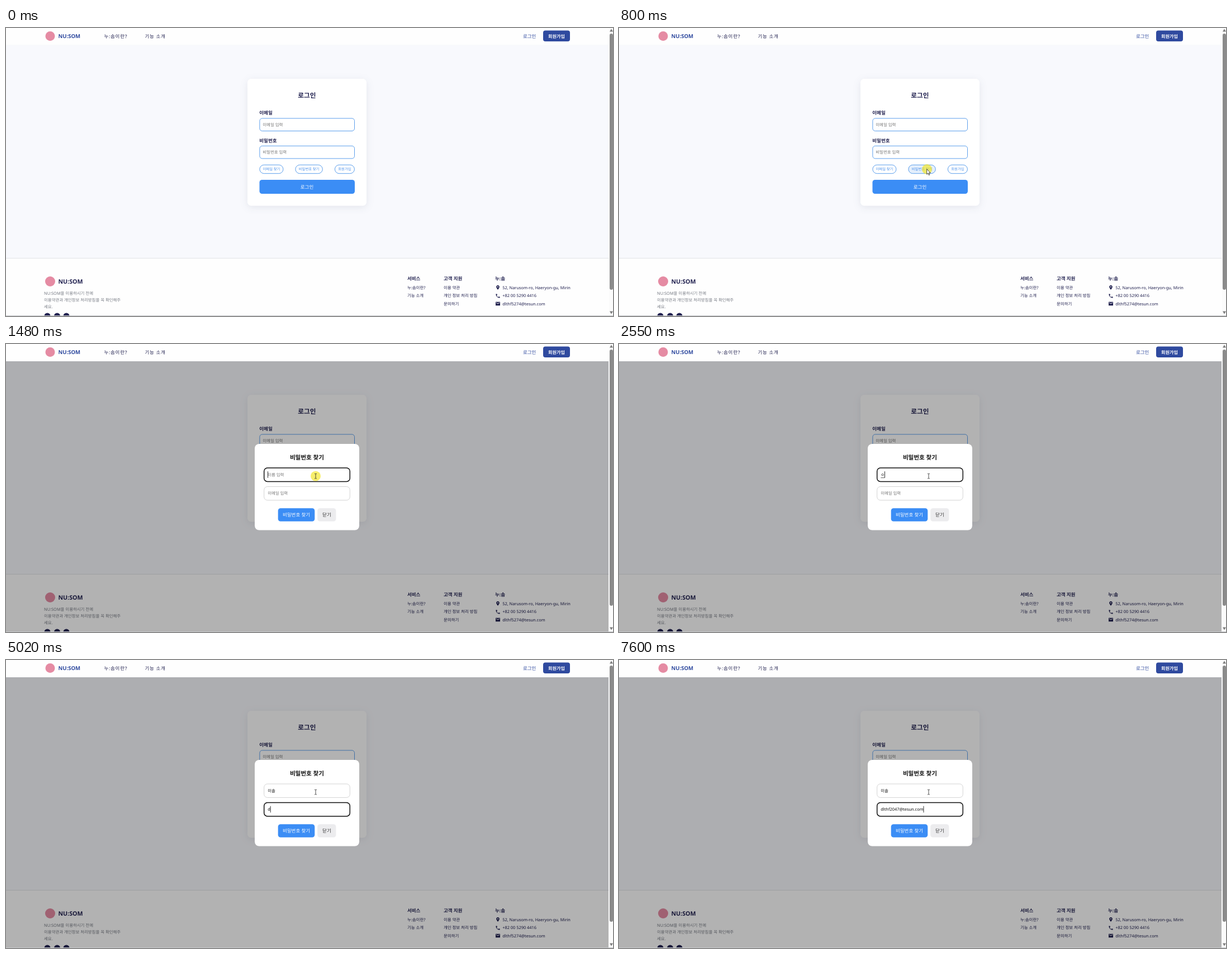
Animation, 1086 px wide and 516 px high, one loop 8000 ms. Source, as an HTML page:

```html
<!DOCTYPE html>
<html lang="ko">
<head>
<meta charset="utf-8">
<title>비밀번호 찾기</title>
<style>
  html, body { margin: 0; width: 100%; height: 100%; overflow: hidden; background: #f8f9fd; }
  svg { display: block; width: 1086px; height: 516px; }
  text {
    font-family: 'Noto Sans', 'Noto Sans CJK KR', 'Noto Sans CJK', sans-serif;
    text-rendering: geometricPrecision;
    white-space: pre;
  }
  .card { filter: drop-shadow(0 3px 7px rgba(30, 40, 80, .09)); }
</style>
</head>
<body>
<svg id="stage" viewBox="0 0 1086 516" xmlns="http://www.w3.org/2000/svg"></svg>
<script>
const LOOP = 8000, OPEN = 830, FOCUS = 1420, TAB = 3310;
const NAVY = '#20204f', INDIGO = '#2f4a9f', BLUE = '#3b8df5', PINK = '#e58ba3';
const S = 7.42, M = 8.48; // small and medium type

const text = (x, y, str, size, fill, weight = 400, extra = '') =>
  `<text x="${x}" y="${y}" font-size="${size}" fill="${fill}" font-weight="${weight}" ${extra}>${str}</text>`;
const mid = (x, y, str, size, fill, weight) => text(x, y, str, size, fill, weight, 'text-anchor="middle"');
const rect = (x, y, w, h, r, fill, extra = '') =>
  `<rect x="${x}" y="${y}" width="${w}" height="${h}" rx="${r}" fill="${fill}" ${extra}/>`;
const dot = (x, y, r, fill, extra = '') => `<circle cx="${x}" cy="${y}" r="${r}" fill="${fill}" ${extra}/>`;
const line = color => `stroke="${color}" stroke-width="1"`;
const icon = (cy, d) =>
  `<path transform="translate(875.2 ${cy - 4.8}) scale(.4)" fill="${NAVY}" fill-rule="evenodd" d="${d}"/>`;

function header() {
  return rect(0, 0, 1079, 31, 0, '#fefefe') + rect(0, 30.5, 1079, .5, 0, '#f1f2f6')
    + dot(79, 14.5, 8.5, PINK)
    + text(93.5, 18.2, 'NU:SOM', 9.54, INDIGO, 600)
    + text(175.5, 18, '누:솜이란?', M, NAVY, 500, 'letter-spacing=".75"')
    + text(248.5, 18, '기능 소개', M, NAVY, 500, 'letter-spacing=".75"')
    + text(925, 17.8, '로그인', M, INDIGO, 500)
    + rect(961, 4.5, 48, 19.5, 4, INDIGO)
    + mid(985, 17.7, '회원가입', 8.1, '#fff', 700);
}

function loginCard() {
  const field = (y, label, hint) =>
    text(453.3, y - 6.6, label, M, NAVY, 700)
    + rect(453.9, y, 169.6, 22.6, 4.5, '#fff', line('#5c9fec'))
    + text(459.3, y + 14, hint, S, '#757575');
  const pill = (x, w, label, id = '') =>
    rect(x, 245.3, w, 15.4, 7.7, '#fff', line('#5c9fec') + id)
    + mid(x + w / 2, 255.3, label, 6.36, '#4a90ea');
  return rect(432, 91, 213, 227.5, 6.5, '#fff', 'class="card"')
    + mid(538.3, 125.3, '로그인', 11.66, NAVY, 700)
    + field(161.9, '이메일', '이메일 입력')
    + field(211.3, '비밀번호', '비밀번호 입력')
    + pill(453.9, 42, '이메일 찾기')
    + pill(517.9, 48.4, '비밀번호 찾기', ' id="pill"')
    + pill(588.4, 35, '회원가입')
    + rect(453.5, 272, 170.5, 25, 4.5, BLUE)
    + mid(538.5, 287.6, '로그인', M, '#fff', 500);
}

function footer() {
  const column = (x, title, items, indent = 0) =>
    text(x, 451.6, title, M, NAVY, 700)
    + items.map((s, i) => text(x + indent, 467.7 + i * 14.5, s, S, NAVY)).join('');
  const notes = ['NU:SOM을 이용하시기 전에', '이용약관과 개인정보 처리방침을 꼭 확인해주', '세요.'];
  return rect(0, 412, 1079, 104, 0, '#fefefe') + rect(0, 412, 1079, 1, 0, '#e2e4e8')
    + dot(79, 454, 9, PINK)
    + text(93.5, 457.6, 'NU:SOM', 10.6, NAVY, 600)
    + notes.map((s, i) => text(68, 477.9 + i * 12, s, S, '#777b84')).join('')
    + [74, 91.5, 108].map(x => dot(x, 516, 5.5, NAVY)).join('')
    + column(718, '서비스', ['누:솜이란?', '기능 소개'])
    + column(783, '고객 지원', ['이용 약관', '개인 정보 처리 방침', '문의하기'])
    + column(875, '누:솜', ['52, Narusom-ro, Haeryon-gu, Mirin', '+82 00 5290 4416', 'dlthf5274@tesun.com'], 13.2)
    + icon(465, 'M12 2C8 2 5 5 5 9c0 5 7 13 7 13s7-8 7-13c0-4-3-7-7-7zm0 4.5a2.5 2.5 0 0 1 0 5a2.5 2.5 0 0 1 0-5z')
    + icon(480, 'M6.6 10.8c1.5 2.8 3.8 5.1 6.6 6.6l2.2-2.2c.3-.3.7-.4 1-.2 1.1.4 2.3.6 3.6.6.6 0 1 .4 1 1V20c0 .6-.4 1-1 1C10.600 21 3 13.400 3 4c0-.6.4-1 1-1h3.500c.6 0 1 .4 1 1 0 1.300.2 2.500.6 3.600.1.300 0 .700-.300 1z')
    + icon(494, 'M2 4h20v16H2zM20 8V6l-8 5-8-5v2l8 5z');
}

function modal() {
  const input = (id, y) => `<g id="${id}">`
    + rect(461.7, y, 153.6, 24.4, 6, '#fff')
    + text(468.2, y + 14.7, '', S, '#111')
    + rect(0, y + 17.4, 6.6, .7, 0, '#222', 'class="under"')
    + rect(0, y + 6.2, .8, 11.6, 0, '#000', 'class="caret"') + '</g>';
  return '<g id="modal">' + rect(0, 31, 1078, 484, 0, '#000', 'opacity=".3"')
    + rect(445, 179, 187, 154.5, 8, '#fff')
    + mid(538.5, 207, '비밀번호 찾기', 10.6, '#111', 700)
    + input('name', 222) + input('mail', 255.5)
    + rect(486.7, 294.3, 65.6, 23.4, 4.5, BLUE)
    + mid(519.5, 309, '비밀번호 찾기', M, '#fff', 500)
    + rect(557.2, 294.3, 33.2, 23.4, 4.5, '#ececee')
    + mid(573.9, 309, '닫기', M, '#333') + '</g>';
}

function chrome() {
  return rect(1078.5, 0, 8, 516, 0, '#fbfbfb') + rect(1080, 10, 6, 459, 3, '#8b8b8b')
    + '<path d="M1080 6.500L1083 1.500L1086 6.500zM1080 507.500L1083 512.500L1086 507.500z" fill="#7d7d7d"/>'
    + rect(0, 515, 1086, 1, 0, '#c6c8cb');
}

const pointer = '<g id="cursor">' + dot(0, 0, 9, '#f3e51c', 'id="glow" opacity=".65"')
  + `<path id="arrow" d="M-.3-.3V9.200L1.900 7.200L3.400 10.700L4.900 10L3.400 6.700H6.300z" fill="#fff" stroke="#222" stroke-width=".8"/>`
  + `<path id="beam" d="M-2-4.300H-.5L0-3.800L.5-4.300H2M0-3.800V3.800M-2 4.300H-.5L0 3.800L.5 4.300H2" fill="none" stroke="#222" stroke-width=".8"/></g>`;

const $ = id => document.getElementById(id);
$('stage').innerHTML = rect(0, 0, 1086, 516, 0, '#f8f9fd') + loginCard() + footer() + modal() + header() + chrome() + pointer;

const path = [[150, 588, 530], [400, 572, 360], [700, 551, 253], [950, 551, 253],
  [1060, 552, 260], [1210, 555, 191], [1390, 554, 236.7]];

// A trailing underscore marks a syllable still being composed.
const nameKeys = [[0, ''], [2120, 'd'], [2400, ''], [2550, 'ㅇ_'], [2630, '이_'], [2720, '잇_'],
  [2800, '이솔_'], [3100, '이솔']];
const mailKeys = [[0, ''], [3870, 'ㅇ_'], [3970, '이_'], [4070, '이소_'], [4170, '이솔_'],
  [4280, '이소_'], [4380, '이_'], [4480, ''], [4640, 'ㅇ_'], [4740, '']];
const address = 'dlthf2047@tesun.com';
[5020, 5090, 5160, 5220, 5280, 5680, 5790, 5900, 6000, 6300, 6540, 6610, 6790, 6870, 6960, 7220, 7380, 7490, 7600]
  .forEach((at, i) => mailKeys.push([at, address.slice(0, i + 1)]));

function position(t) {
  const i = path.findIndex(p => p[0] > t);
  if (i < 0) return path[path.length - 1].slice(1);
  if (i === 0) return path[0].slice(1);
  const [a, b] = [path[i - 1], path[i]];
  const u = (t - a[0]) / (b[0] - a[0]), e = u * u * (3 - 2 * u);
  return [a[1] + (b[1] - a[1]) * e, a[2] + (b[2] - a[2]) * e];
}

const show = (el, on) => el.setAttribute('visibility', on ? 'inherit' : 'hidden');

function drawInput(id, keys, hint, t, focused, caretOn) {
  const g = $(id), box = g.querySelector('rect'), label = g.querySelector('text');
  const under = g.querySelector('.under'), caret = g.querySelector('.caret');
  const raw = keys.filter(k => k[0] <= t).pop()[1];
  const value = raw.replace('_', '');
  const shown = value || hint;
  if (label.textContent !== shown) label.textContent = shown;
  label.setAttribute('fill', value ? '#111' : '#757575');
  box.setAttribute('stroke', focused ? '#101010' : '#cfcfcf');
  box.setAttribute('stroke-width', focused ? 1.5 : .9);
  const end = 468.2 + (value ? label.getComputedTextLength() : 0);
  caret.setAttribute('x', end);
  under.setAttribute('x', end - 6.7);
  show(caret, focused && caretOn);
  show(under, focused && raw.endsWith('_'));
}

function render(t) {
  const [x, y] = position(t);
  const open = t >= OPEN;
  const inField = open && x > 461 && x < 616 && ((y > 222 && y < 247) || (y > 255 && y < 280));
  $('cursor').setAttribute('transform', `translate(${x} ${y})`);
  show($('arrow'), !inField);
  show($('beam'), inField);
  show($('glow'), (t >= 740 && t < OPEN) || (t >= 1400 && t < 1570));
  $('pill').setAttribute('fill', !open && y < 261 ? '#e4effc' : '#fff');
  $('modal').setAttribute('visibility', open ? 'visible' : 'hidden');
  drawInput('name', nameKeys, '이름 입력', t, t >= FOCUS && t < TAB, t < 1920 || t >= 2120);
  drawInput('mail', mailKeys, '이메일 입력', t, t >= TAB, true);
}

function tick() {
  render(performance.now() % LOOP);
  requestAnimationFrame(tick);
}
tick();
</script>
</body>
</html>
```
